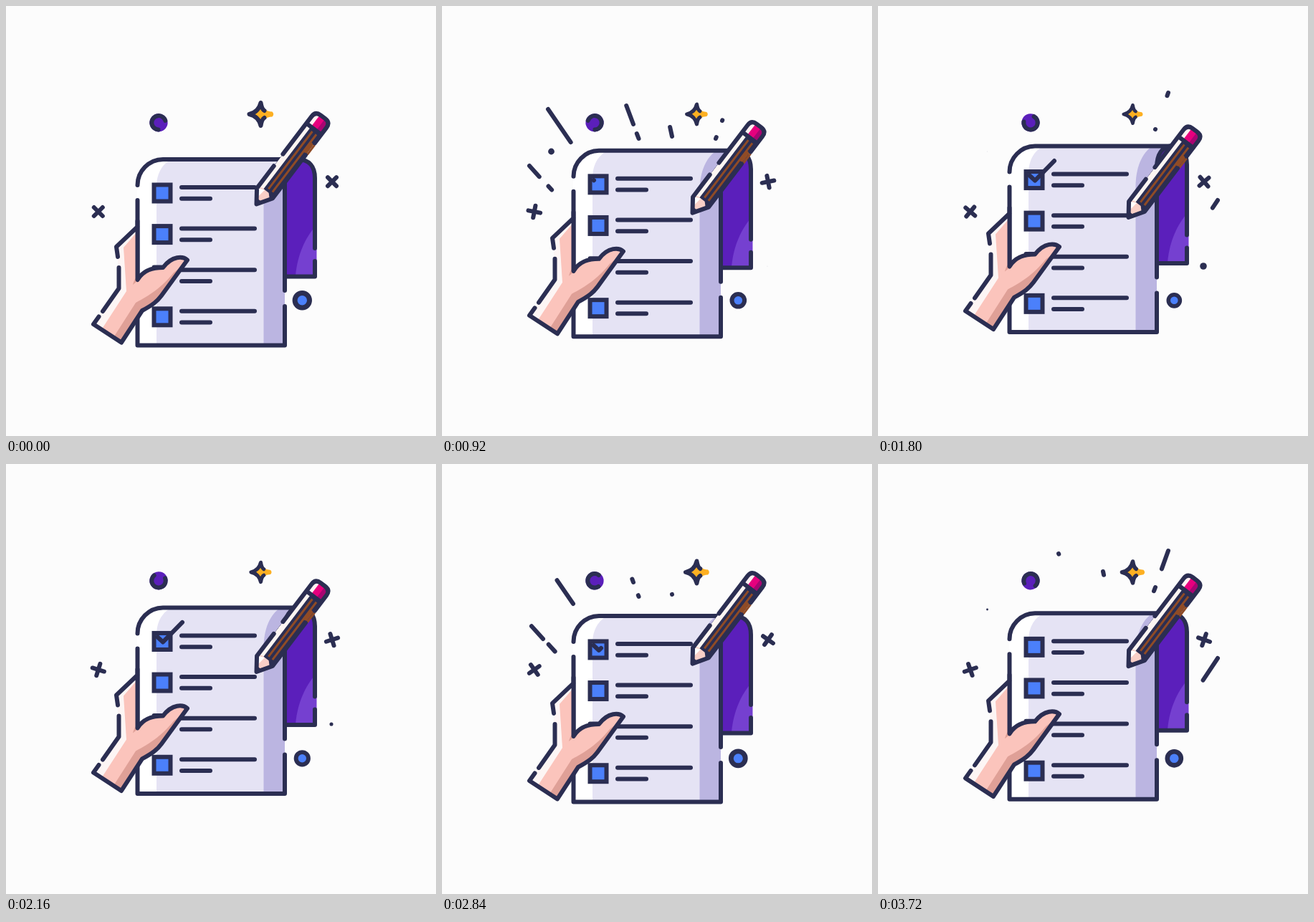
An HTML page that plays this animation: 600x600 px, repeating every 3760 ms.

```html
<!DOCTYPE html>
<html lang="en">
<head>
<meta charset="utf-8">
<title>Checklist</title>
<style>
  html, body { margin: 0; width: 100%; height: 100%; overflow: hidden; background: #fcfcfc; }
  svg { display: block; width: 100vw; height: 100vh; }
  .ink { fill: none; stroke: #2b2e52; stroke-width: 6; stroke-linecap: round; stroke-linejoin: round; }
</style>
</head>
<body>
<svg viewBox="0 0 600 600">
  <defs>
    <clipPath id="sheetClip">
      <path d="M183 473V250A36 36 0 0 1 219 214H411C396 214 389 226 389 244V473Z"/>
    </clipPath>
    <clipPath id="handClip">
      <path id="handShape" d="M183 308L154 336L156 350L157 394L122 444L161 469L190 425C205 417 211 412 217 404L253 354C247 349 232 348 219 365C205 365 192 368 183 382Z"/>
    </clipPath>
    <clipPath id="pencilClip">
      <path id="pencilShape" d="M0 0L-13 -18V-144Q-13 -153 -4 -153H4Q13 -153 13 -144V-20Z"/>
    </clipPath>
  </defs>

  <g id="rays" class="ink"></g>
  <circle id="dotLeft" cx="152.500" cy="203" fill="#2b2e52"/>
  <circle id="dotRight" cx="454" cy="363" fill="#2b2e52"/>

  <g id="swirl">
    <circle r="12.600" fill="#5b1fbb"/>
    <circle class="ink" r="9.700" pathLength="360" stroke-dasharray="250 110" stroke-dashoffset="-55"/>
  </g>
  <g id="star">
    <path d="M0 -16Q3 -4 16 -3.500Q19.500 0 16 3.500Q3 4 0 16Q-3 3 -16 0Q-3 -3 0 -16Z" fill="#fdb022"/>
    <path class="ink" stroke-width="7" d="M5 -5Q1.500 -7 0 -16Q-3 -3 -16 0Q-3 3 0 16Q1.500 7 5 5"/>
  </g>
  <g id="ring">
    <circle class="ink" r="10.200" style="fill:#4b80fb;stroke-width:7"/>
  </g>
  <path id="crossLeft" class="ink" d="M-6 -6L6 6M6 -6L-6 6"/>
  <path id="crossRight" class="ink" d="M-6 -6L6 6M6 -6L-6 6"/>

  <g id="sheet">
    <path d="M389 377V214H407C423 214 431 224 431 240V377Z" fill="#5b1fbb"/>
    <path d="M404 376C407 345 418 324 431 308L433.500 336V376Z" fill="#7540d0"/>
    <path class="ink" d="M407 214C423 214 431 224 431 240V338M431 356V377.500H391"/>
    <g clip-path="url(#sheetClip)">
      <path d="M180 210H415V476H180Z" fill="#fff"/>
      <path d="M210 473V252C210 232 220 217 235 213H415V473Z" fill="#e5e3f4"/>
      <path d="M359.500 473V270C359.500 245 368 222 385 213H415V473Z" fill="#bbb5e1"/>
    </g>
    <path class="ink" d="M183.500 250A36 36 0 0 1 219 214H411C396 214 389 226 389 244V397M389 419V473.500H183.500V271"/>
    <g id="rows" class="ink"></g>
    <path id="tick" class="ink" d="M211.500 255L219 262L246 234.500" pathLength="100"/>

    <g clip-path="url(#handClip)">
      <path d="M110 300H260V480H110Z" fill="#fdf5f4"/>
      <path d="M184 314L164 337L168 398L133 452L161 472L260 400V340L183 375Z" fill="#fbc4bc"/>
      <path d="M149 464L181 414C200 404 216 394 234 372L262 350L225 412L192 432L163 472Z" fill="#dfa097"/>
      <path d="M177 389C180 378 186 370 204 368C194 374 187 381 177 389Z" fill="#dfa097"/>
    </g>
    <path class="ink" d="M183.500 308L154 336L156 350M157.500 365V394L135 426M129.500 433.500L122 444L161 469.500L190 425C205 417 211 412 217 404L253 354.500C247 349 232 348 219 365C205 365 192 368 183.500 382V300M206.500 364.500H219"/>
  </g>

  <g id="pencil">
    <use href="#pencilShape" fill="#2b2e52"/>
    <path d="M13 -98H16V-115H13Z" fill="#8f4b26"/>
    <g clip-path="url(#pencilClip)">
      <path d="M-13 -18V-132H-5V-22Z" fill="#fdf5f2"/>
      <path d="M-14 -18L-5 -7H4L10 -17L4 -23H-8Z" fill="#f9cfc7"/>
      <path d="M-14 -18L-5 -7L-3 -23Z" fill="#fff"/>
      <path d="M-1 -27H2V-128H-1ZM6 -27H9V-128H6ZM8 -98H16V-115H8Z" fill="#8f4b26"/>
      <path d="M-14 -134H14V-156H-14Z" fill="#e6007e"/>
      <path d="M-14 -134H-5V-156H-14Z" fill="#fff0f2"/>
      <path d="M4 -134H14V-156H4Z" fill="#a80572"/>
    </g>
    <path class="ink" d="M-13 -78V-144Q-13 -153 -4 -153H4Q13 -153 13 -144V-117M13 -96V-20L0 0L-13 -18V-57M-13 -132H13"/>
  </g>
</svg>
<script>
const LOOP = 3760;
const HALF = 1580;         // one way of the float
const BURST = 2150;        // time between ray bursts
const GROW = 580, LAG = 465;
const LIFT = 19.5;

const $ = id => document.getElementById(id);
const clamp = x => Math.min(1, Math.max(0, x));
const ease = x => { x = clamp(x); return x * x * (3 - 2 * x); };
const mix = (a, b, k) => a + (b - a) * k;

function add(parent, tag, attrs) {
  const el = document.createElementNS("http://www.w3.org/2000/svg", tag);
  for (const key in attrs) el.setAttribute(key, attrs[key]);
  parent.appendChild(el);
  return el;
}

// inner x, y, outer x, y, start
const rays = [
  [183, 195, 148, 144, 345],
  [141, 244, 122, 223, 255],
  [158, 262, 148.5, 251.5, 160],
  [267, 165, 252, 125, 572],
  [274.5, 185, 271, 176, 525],
  [321, 182, 314, 150, 668],
  [382, 185, 387, 172, 778],
  [391, 160, 405, 121, 875],
  [450, 307, 474, 271, 965]
].map(spec => ({ spec, el: add($("rays"), "line", {}) }));

for (let i = 0; i < 4; i++) {
  const y = 253 + i * 57.6;
  if (i !== 2) add($("rows"), "rect", { x: 206.5, y: y - 3.5, width: 23, height: 23, fill: "#4b80fb", "stroke-linejoin": "miter" });
  add($("rows"), "path", { d: `M245 ${y}H347M245 ${y + 15.7}H285` });
}

function drawRay({ spec, el }, t) {
  const [x, y, X, Y, start] = spec;
  const head = ease((t - start) / GROW);
  const tail = ease((t - start - LAG) / GROW);
  const on = head > 0.003 && tail < 0.997;
  el.setAttribute("visibility", on ? "visible" : "hidden");
  if (!on) return;
  el.setAttribute("x1", mix(x, X, tail));
  el.setAttribute("y1", mix(y, Y, tail));
  el.setAttribute("x2", mix(x, X, head));
  el.setAttribute("y2", mix(y, Y, head) + 0.01);
}

function drawDot(el, t, size) {
  const k = t / 1520;
  el.setAttribute("r", k > 0 && k < 1 ? size * Math.sin(Math.PI * k) : 0);
}

const place = (id, value) => $(id).setAttribute("transform", value);

function draw(t) {
  const phase = t % (2 * HALF);
  const k = phase < HALF ? ease(phase / HALF) : 1 - ease(phase / HALF - 1);
  const size = 1 - 0.22 * k;

  place("sheet", `translate(0 ${-LIFT * k})`);
  place("pencil", `translate(349.5 ${276.5 + LIFT * k}) rotate(37.3)`);
  place("crossLeft", `translate(128.8 287) rotate(${90 * k})`);
  place("crossRight", `translate(455 245.2) rotate(${-90 * k})`);
  place("swirl", `translate(213 162.8) rotate(${38 + 180 * t / HALF})`);
  place("star", `translate(355.5 151) scale(${size})`);
  place("ring", `translate(413.3 410.8) scale(${size})`);

  const shown = 100 * ease((t - 890) / 460) * (1 - ease((t - 2560) / 440));
  $("tick").setAttribute("visibility", shown > 0.1 ? "visible" : "hidden");
  $("tick").setAttribute("stroke-dasharray", `${shown} 300`);

  const burst = t < BURST ? t : t - BURST;
  rays.forEach(ray => drawRay(ray, burst));
  drawDot($("dotLeft"), t < 3000 ? t - 300 : t - 3570, 4.6);
  drawDot($("dotRight"), t - 900, 5);
}

function tick() {
  draw(performance.now() % LOOP);
  requestAnimationFrame(tick);
}
tick();
</script>
</body>
</html>
```
